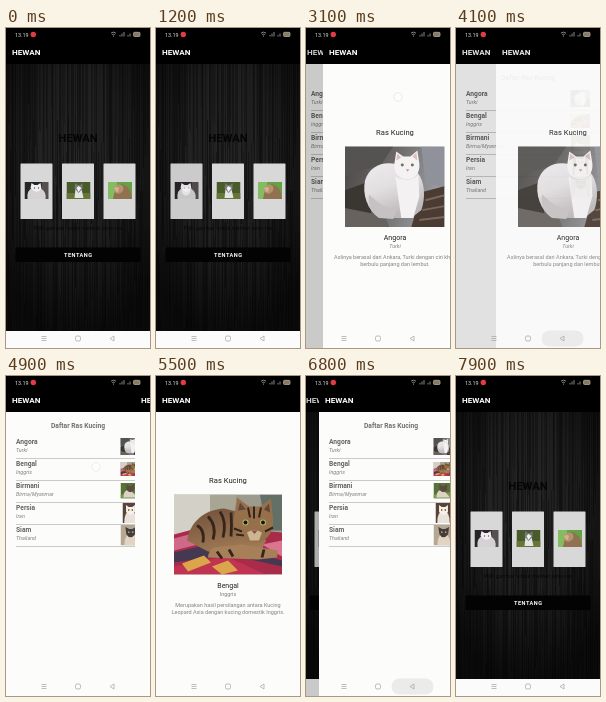
An HTML page for the animation above (8000 ms loop, 144x320 px).

```html
<!DOCTYPE html>
<html lang="id">
<head>
<meta charset="utf-8">
<title>Hewan</title>
<style>
html, body { margin: 0; width: 100%; height: 100%; overflow: hidden; background: #000; }
svg { display: block; width: 100vw; height: 100vh; }
text { font-family: Roboto, "Noto Sans", sans-serif; }
.bold { font-weight: 700; }
.mid { text-anchor: middle; }
.it { font-style: italic; }
</style>
</head>
<body>
<svg id="stage" viewBox="0 0 144 320" xmlns="http://www.w3.org/2000/svg">
<defs>
  <radialGradient id="vignette" cx=".5" cy=".36" r=".66">
    <stop offset="0" stop-color="#000" stop-opacity="0"/>
    <stop offset=".5" stop-color="#000" stop-opacity=".2"/>
    <stop offset="1" stop-color="#000" stop-opacity=".7"/>
  </radialGradient>
  <linearGradient id="stone" x2="1" y2=".25">
    <stop offset="0" stop-color="#4a4846"/><stop offset=".5" stop-color="#6b6866"/>
    <stop offset="1" stop-color="#9a9ca2"/>
  </linearGradient>
  <linearGradient id="fur" x2=".4" y2="1">
    <stop offset="0" stop-color="#eeecee"/><stop offset=".5" stop-color="#e2dfe1"/>
    <stop offset="1" stop-color="#bdb9bb"/>
  </linearGradient>
  <linearGradient id="tabby" x2=".3" y2="1">
    <stop offset="0" stop-color="#70503a"/><stop offset="1" stop-color="#a37c57"/>
  </linearGradient>
  <filter id="soft" x="0" y="0" width="1" height="1"><feGaussianBlur stdDeviation=".7"/></filter>

  <symbol id="angora" viewBox="0 0 99 81" preserveAspectRatio="none">
    <rect width="99" height="81" fill="url(#stone)"/>
    <g filter="url(#soft)">
      <rect width="99" height="81" fill="url(#stone)"/>
      <path d="M0 0H48L36 18 0 30Z" fill="#555350"/>
      <path d="M76 0H99V42L80 36Z" fill="#8f929a"/>
      <path d="M0 44L22 36 28 81H0Z" fill="#3a3632"/>
      <path d="M0 62L40 70 44 81H0Z" fill="#67625e"/>
      <path d="M76 46L99 40V81H66Z" fill="#4a3b33"/>
      <path d="M80 54L99 49M77 64L99 60M74 74L99 71" stroke="#7a6759" stroke-width="2"/>
      <path d="M20 34C24 20 38 14 52 18L72 26C80 36 80 52 76 64L66 72H34C22 64 17 48 20 34Z" fill="url(#fur)"/>
      <path d="M24 48C34 58 40 62 52 62L48 73 34 72C26 66 22 58 24 48Z" fill="#c6c2c4"/>
      <path d="M50 30Q62 38 73 29L74 50 68 72H56Z" fill="#f3f1f2"/>
      <path d="M49 18L51 5 58 10H65L72 4 74 17C75 28 68 33 62 33C55 33 48 27 49 18Z" fill="#f4f2f3"/>
      <path d="M51 14L52 7 56 11ZM67 10L71 6 72 14Z" fill="#d8bfc0"/>
    </g>
    <g fill="#6d7358"><circle cx="57" cy="18.500" r="1.500"/><circle cx="67" cy="18.500" r="1.500"/></g>
    <path d="M60.500 23H64L62.300 25.300Z" fill="#c99a9a"/>
  </symbol>

  <symbol id="bengal" viewBox="0 0 108 80" preserveAspectRatio="none">
    <rect width="108" height="80" fill="#9d9b8d"/>
    <g filter="url(#soft)">
      <rect width="108" height="80" fill="#9d9b8d"/>
      <path d="M0 0H36V32L0 42Z" fill="#d3d0c8"/>
      <path d="M36 0H62V16L36 26Z" fill="#a9a595"/>
      <path d="M86 0H108V36H92Z" fill="#637068"/>
      <path d="M0 40L30 32 108 38V80H0Z" fill="#a92b4a"/>
      <path d="M0 44L30 36 48 44 0 56Z" fill="#d0688a"/>
      <path d="M0 58L42 48 108 66V72L54 60 0 68Z" fill="#443951"/>
      <path d="M0 72L52 62 92 80H0Z" fill="#c03452"/>
      <path d="M8 69L30 61 37 68 14 77ZM38 72L54 66 64 76 48 80Z" fill="#dba54b"/>
      <path d="M88 50L108 46V62Z" fill="#d8758f"/>
      <path d="M13 46C16 27 31 15 50 14L75 20 92 46 84 64 56 61 34 57Z" fill="url(#tabby)"/>
      <path d="M40 53L68 50 104 56 103 63 84 65 34 63Q34 57 40 53Z" fill="#a77f58"/>
      <g fill="none" stroke="#35251b" stroke-width="2.800">
        <path d="M23 31Q31 35 29 48M34 22Q43 31 39 45M46 17Q53 27 49 43M57 18Q58 31 57 42M43 57L48 64M55 55L59 62M90 55L88 63"/>
      </g>
      <path d="M60 23L63 3 75 12H86L97 4 99 25C100 40 91 48 80 48C67 47 57 36 60 23Z" fill="#96704b"/>
      <path d="M64 16L66 8 72 15ZM90 15L95 9 96 18Z" fill="#61463a"/>
      <path d="M74 13L76 23M80 12V24M87 13L85 23M60 34L68 37M62 40L70 41M99 33L91 37" stroke="#33251c" stroke-width="2"/>
      <path d="M73 38Q80 33 88 38L85 46H76Z" fill="#ccb692"/>
    </g>
    <g fill="#b3b36a"><circle cx="71.500" cy="28" r="3"/><circle cx="89" cy="28" r="3"/></g>
    <g fill="#17130e"><circle cx="71.500" cy="28" r="1.900"/><circle cx="89" cy="28" r="1.900"/></g>
    <path d="M77.500 36H83.500L80.500 39.500Z" fill="#8d4a3e"/>
  </symbol>

  <symbol id="birmani" viewBox="0 0 20 16" preserveAspectRatio="none">
    <rect width="20" height="16" fill="#557338"/><path d="M0 12L20 9V16H0Z" fill="#7f9650"/>
    <path d="M3 15Q3 6 10 7L17 15Z" fill="#ddd3c2"/>
    <path d="M6 7L6 1 9 3H11L14 1 14 7Q10 12 6 7Z" fill="#5b4a40"/>
  </symbol>
  <symbol id="persia" viewBox="0 0 18 20" preserveAspectRatio="none">
    <rect width="18" height="20" fill="#5b4336"/>
    <path d="M2 20Q2 8 9 8T16 20Z" fill="#e9e2da"/>
    <path d="M4 9L4 2 7 4H11L14 2 14 9Q9 15 4 9Z" fill="#f5f0ea"/>
    <g fill="#805f35"><circle cx="7" cy="7" r=".9"/><circle cx="11" cy="7" r=".9"/></g>
  </symbol>
  <symbol id="siam" viewBox="0 0 20 20" preserveAspectRatio="none">
    <rect width="20" height="20" fill="#b5a794"/>
    <path d="M4 20Q4 8 11 9T17 20Z" fill="#e1d4c0"/>
    <path d="M6 9L5 2 9 4H12L16 2 15 9Q10 15 6 9Z" fill="#4b3b35"/>
    <g fill="#83a9ca"><circle cx="8.500" cy="7" r=".9"/><circle cx="12.500" cy="7" r=".9"/></g>
  </symbol>
  <symbol id="cat" viewBox="0 0 24 17" preserveAspectRatio="none">
    <rect width="24" height="17" fill="#272527"/><path d="M17 0H24V17H18Z" fill="#55504f"/>
    <path d="M3 17Q2 8 8 6L17 7Q22 10 21 17Z" fill="#d4d2d5"/>
    <path d="M6 6L7 1 10 3H13L16 1 17 7Q12 13 6 6Z" fill="#f0eef0"/>
    <g fill="#555"><circle cx="10" cy="6" r=".7"/><circle cx="14" cy="6" r=".7"/></g>
  </symbol>
  <symbol id="dog" viewBox="0 0 24 17" preserveAspectRatio="none">
    <rect width="24" height="17" fill="#4a5b2b"/><path d="M0 11H24V17H0Z" fill="#657638"/>
    <path d="M8 16L9 7H15L17 16Z" fill="#e4e4e2"/>
    <path d="M8 6L9 1 11 3H14L16 1 16 7 12 11Z" fill="#777a7c"/>
    <path d="M10 6L12 4 15 6 12 10Z" fill="#f2f2ef"/>
  </symbol>
  <symbol id="monkey" viewBox="0 0 24 17" preserveAspectRatio="none">
    <rect width="24" height="17" fill="#63a344"/><path d="M0 0H9V17H0Z" fill="#84bc61"/>
    <path d="M5 17Q7 3 14 2Q23 4 24 17Z" fill="#907250"/>
    <path d="M6 6Q10 0 15 4Q17 10 10 12Q5 10 6 6Z" fill="#b3936c"/>
    <path d="M6 6Q9 4 11 6L10 10Q7 10 6 6Z" fill="#d9ad91"/>
  </symbol>
</defs>
<g id="home"></g>
<g id="list"></g>
<g id="angoraPage"></g>
<g id="bengalPage"></g>
<g id="system">
  <rect width="144" height="13" fill="#000"/>
  <text x="9" y="8.600" font-size="5.400" fill="#ddd">13.19</text>
  <circle cx="27.300" cy="6.500" r="2.700" fill="#e23b43"/>
  <g fill="none" stroke="#aaa" stroke-width=".8">
    <path d="M105 5.200Q107.500 3 110 5.200M106.200 6.700Q107.500 5.600 108.800 6.700M107.500 7.500V8.700"/>
    <path d="M114 8.500V7M116 8.500V5.500M118 8.500V4M122 8.500V7M124 8.500V5.500"/>
    <rect x="127.500" y="4.300" width="6.500" height="4.200" rx="1" fill="#8a7a5c"/>
  </g>
  <rect id="backGlow" x="85.500" y="302.500" width="42" height="16" rx="8" fill="#ebebeb"/>
  <g fill="none" stroke="#a2a2a2" stroke-width=".7">
    <path d="M35.500 308.500H40.500M35.500 310.500H40.500M35.500 312.500H40.500"/>
    <rect x="69.500" y="308" width="5" height="5" rx="1.500"/>
    <path d="M108 308V313L104 310.500Z"/>
  </g>
  <circle id="dot" r="4.200" fill="#fff" fill-opacity=".5" stroke="#dedede" stroke-width=".6"/>
</g>
</svg>
<script>
const W = 144, LOOP = 8000, BAR = 36;
const $ = id => document.getElementById(id);
const clamp = (v, a = 0, b = 1) => Math.min(b, Math.max(a, v));

const rect = (x, y, w, h, fill, more = '') =>
  `<rect x="${x}" y="${y}" width="${w}" height="${h}" fill="${fill}" ${more}/>`;
const text = (s, x, y, size, fill, cls = '', more = '') =>
  `<text x="${x}" y="${y}" font-size="${size}" fill="${fill}" class="${cls}" ${more}>${s}</text>`;
const pic = (id, x, y, w, h) =>
  `<use href="#${id}" x="${x}" y="${y}" width="${w}" height="${h}"/>`;

// Every page has its own app bar and a shade for when it lies below another.
const page = (id, body) => {
  $(id).innerHTML = rect(0, BAR, W, 320 - BAR, '#fcfcfb') + body +
    rect(0, 0, W, BAR, '#000') + text('HEWAN', 6, 27, 8.1, '#fff', 'bold') +
    rect(0, 0, W + 10, 320, '#000', 'class="shade" opacity="0"');
};

function wood() {
  let seed = 11, out = rect(0, BAR, W, 303 - BAR, '#1d1d1d');
  const rnd = () => (seed = seed * 16807 % 2147483647) / 2147483647;
  for (let x = 0; x < W; x++) {
    for (let y = BAR; y < 303;) {
      const h = Math.min(303 - y, 40 + rnd() * 150), g = Math.round(19 + rnd() * 22);
      out += rect(x, y, 1, h, `rgb(${g},${g},${g})`);
      y += h;
    }
  }
  return out + rect(0, BAR, W, 303 - BAR, 'url(#vignette)');
}

const cards = [['cat', 14.5, 18.5], ['dog', 56, 60.5], ['monkey', 97.5, 102]];
page('home', wood() +
  text('HEWAN', 72, 114, 11.3, '#050505', 'bold mid') +
  cards.map(([id, x, px], i) =>
    rect(x, 135.5, 32, 55.5, '#d8d8d8', 'rx=".6"') + pic(id, px, 154, 24, 17) +
    rect(x, 135.5, 32, 55.5, '#000', `id="press${i}" opacity="0"`)).join('') +
  text('Pilih gambar untuk melihat jenis ras', 72, 202, 5.6, '#080808', 'mid') +
  rect(9.5, 219.5, 125, 14.5, '#030303', 'rx="1"') +
  text('TENTANG', 72.3, 229, 5.6, '#fff', 'bold mid', 'letter-spacing=".5"') +
  rect(0, 303, W, 17, '#fbfbfb'));

const rows = [
  ['Angora', 'Turki', 'angora', 62, 17], ['Bengal', 'Inggris', 'bengal', 86, 14],
  ['Birmani', 'Birma/Myanmar', 'birmani', 107, 15.5],
  ['Persia', 'Iran', 'persia', 127, 20], ['Siam', 'Thailand', 'siam', 149, 20.5]
];
page('list', text('Daftar Ras Kucing', 72, 52.3, 6.7, '#707070', 'bold mid') +
  rows.map(([name, land, id, y, h], i) =>
    text(name, 10, 67.6 + 22 * i, 6.7, '#646464', 'bold') +
    text(land, 10, 75.8 + 22 * i, 5.4, '#808080', 'it') +
    pic(id, id === 'persia' ? 116.5 : 114.5, y, id === 'persia' ? 16 : 19.5, h) +
    rect(10, 82.2 + 22 * i, 134, .6, '#aaa')).join(''));

const detail = (id, photo, name, land, cls, lines) => page(id,
  text('Ras Kucing', 72, 106.5, 7.6, '#222', 'mid') + photo +
  text(name, 72, 212, 7, '#222', 'mid') +
  text(land, 72, 220, 5.4, '#808080', 'mid ' + cls) +
  lines.map((s, i) => text(s, 72, 231 + 7.2 * i, 5.5, '#808080', 'mid')).join(''));
detail('angoraPage', pic('angora', 22, 118.5, 99.5, 80.5), 'Angora', 'Turki', 'it',
  ['Aslinya berasal dari Ankara, Turki dengan ciri khas', 'berbulu panjang dan lembut.']);
detail('bengalPage', pic('bengal', 18, 118.5, 108, 80), 'Bengal', 'Inggris', '',
  ['Merupakan hasil persilangan antara Kucing', 'Leopard Asia dengan kucing domestik Inggris.']);

// page, page below, start of opening, start of closing
const slides = [
  ['list', 'home', 1605, 6736],
  ['angoraPage', 'list', 2886, 3985],
  ['bengalPage', 'list', 4886, 5900]
];
const OPEN = 420, CLOSE = 330;
// start, end, x, y
const taps = [[1060, 1500, 30, 163], [2560, 3300, 92, 69], [4460, 5050, 90, 91], [7360, 7880, 72, 163]];
const backs = [[3760, 4340], [5660, 6340], [6460, 7300]];
// card, start, end
const presses = [[0, 1060, 1520], [1, 7360, 7900]];

const pulse = (t, a, b) => clamp(Math.min((t - a) / 100, (b - t) / 180));

function slideX(t, open, close) {
  if (t < open || t >= close + CLOSE) return W;
  if (t < close) return W * (1 - clamp((t - open) / OPEN)) ** 3;
  return W * (.5 - .5 * Math.cos(Math.PI * (t - close) / CLOSE));
}

function draw(t) {
  const pos = { home: 0 }, dim = {};
  for (const [id, below, open, close] of slides) {
    const x = slideX(t, open, close), shown = x < W;
    pos[id] = x;
    if (shown && x > 0) {
      pos[below] += Math.min(0, (x - 41) / 5);
      dim[below] = clamp((66 - x) / 245, 0, .2);
    }
    $(id).style.display = shown ? '' : 'none';
    $(id).style.opacity = t >= close ? 1 - Math.max(0, x - 13) / 350 : 1;
  }
  for (const id in pos) {
    $(id).setAttribute('transform', `translate(${Math.round(pos[id])} 0)`);
    $(id).querySelector('.shade').setAttribute('opacity', dim[id] || 0);
  }
  const tap = taps.find(([a, b]) => t >= a && t < b);
  $('dot').setAttribute('opacity', tap ? pulse(t, tap[0], tap[1]) : 0);
  if (tap) $('dot').setAttribute('transform', `translate(${tap[2]} ${tap[3]})`);
  $('backGlow').setAttribute('opacity', Math.max(...backs.map(([a, b]) => pulse(t, a, b))));
  for (const [i, a, b] of presses) $('press' + i).setAttribute('opacity', .06 * pulse(t, a, b));
}

const began = performance.now();
function tick() {
  draw((performance.now() - began) % LOOP);
  requestAnimationFrame(tick);
}
tick();
</script>
</body>
</html>
```
